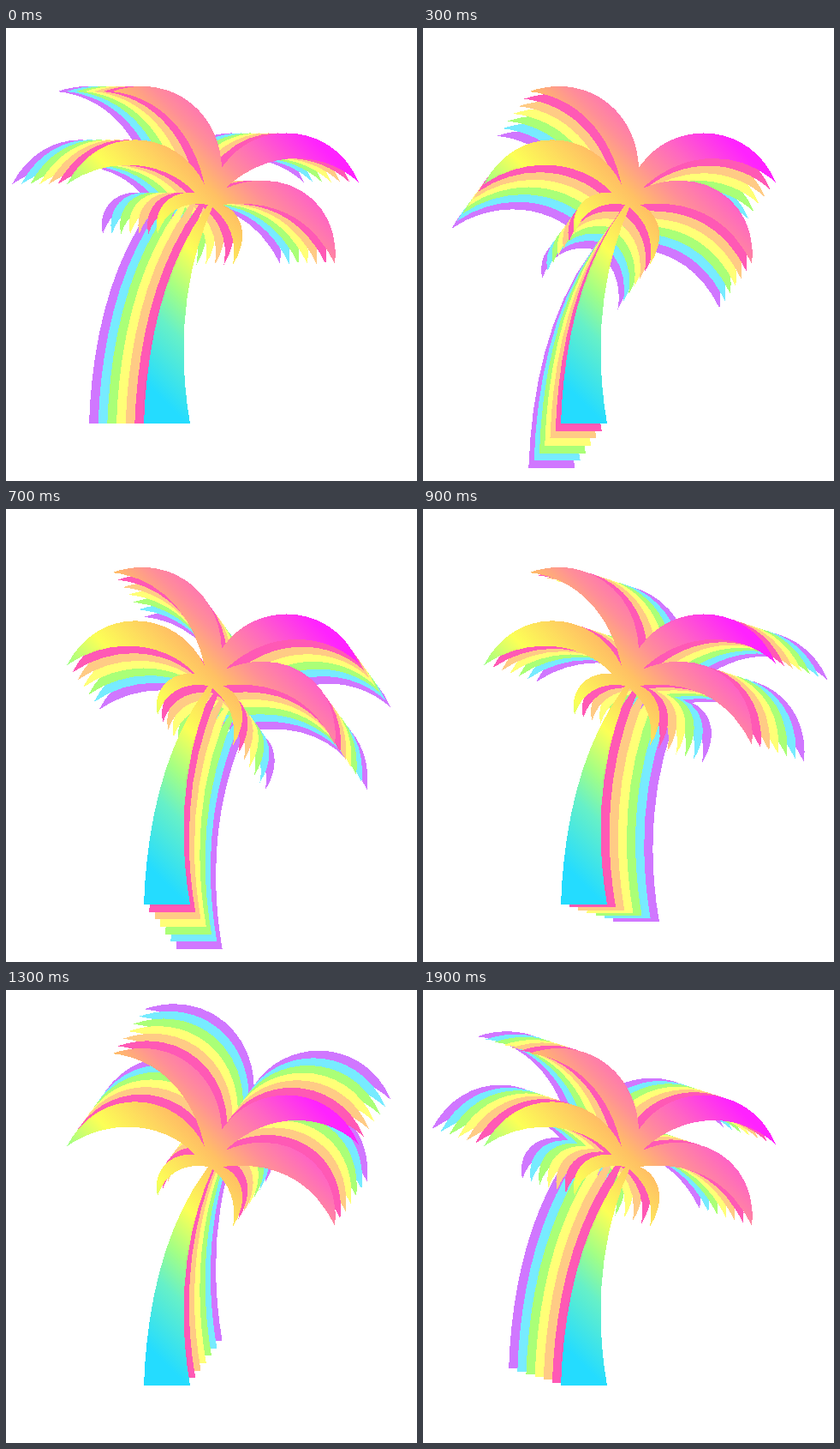
Recreate the animation shown at these times as an HTML page. Size 480 px wide and 528 px high, loop 2 s.

```html
<!DOCTYPE html>
<html lang="en">
<head>
<meta charset="utf-8">
<title>Rainbow palm</title>
<style>
  html, body { margin: 0; width: 100%; height: 100%; overflow: hidden; background: #fff; }
  svg { display: block; width: 100%; height: 100%; }
</style>
</head>
<body>
<svg viewBox="0 0 480 528" shape-rendering="crispEdges">
  <defs>
    <linearGradient id="sunset" gradientUnits="userSpaceOnUse" x1="-125" y1="125" x2="115" y2="-115">
      <stop offset="0" stop-color="#24dcff"/>
      <stop offset=".19" stop-color="#66f0c8"/>
      <stop offset=".3" stop-color="#a4ff84"/>
      <stop offset=".43" stop-color="#fcff56"/>
      <stop offset=".625" stop-color="#ffc064"/>
      <stop offset=".73" stop-color="#ff8e98"/>
      <stop offset=".835" stop-color="#ff68c0"/>
      <stop offset="1" stop-color="#ff22ff"/>
    </linearGradient>
    <!-- Trunk, then the fronds clockwise from the lower left, back to the trunk -->
    <path id="palm" d="
      M161 461 C164 375 182 278 236 206
      C212 202 187 210 177 240 C171 215 187 189 221 192
      C186 155 122 147 71 182 C110 108 202 118 232 183
      C219 123 180 80 124 74 C192 51 250 97 252 163
      C290 105 382 108 412 180 C372 143 306 140 256 187
      C327 157 392 203 384 275 C355 215 305 200 253 206
      C276 215 285 245 265 276 C270 250 262 225 241 209
      C207 285 200 375 215 461 Z"/>
  </defs>
  <g id="trail"></g>
  <use href="#palm" fill="url(#sunset)"/>
</svg>
<script>
  const LOOP = 2000, STEPS = 20, RADIUS = 64;
  const colors = ['#d077ff', '#77ebff', '#aaff77', '#ffff77', '#ffcb85', '#ff59b5'];
  const trail = document.getElementById('trail');

  const layers = colors.map((color, i) => {
    const layer = document.createElementNS('http://www.w3.org/2000/svg', 'use');
    layer.setAttribute('href', '#palm');
    layer.setAttribute('fill', color);
    trail.append(layer);
    return { layer, reach: RADIUS * (1 - i / colors.length) };
  });

  // The trail circles the palm in hard steps, starting at its left.
  function draw(time) {
    const step = Math.floor((time % LOOP) / LOOP * STEPS);
    const angle = step / STEPS * 2 * Math.PI;
    for (const { layer, reach } of layers) {
      const x = -reach * Math.cos(angle), y = reach * Math.sin(angle);
      layer.setAttribute('transform', `translate(${x.toFixed(2)} ${y.toFixed(2)})`);
    }
  }

  const start = performance.now();
  function tick() {
    draw(performance.now() - start);
    requestAnimationFrame(tick);
  }
  tick();
</script>
</body>
</html>
```
